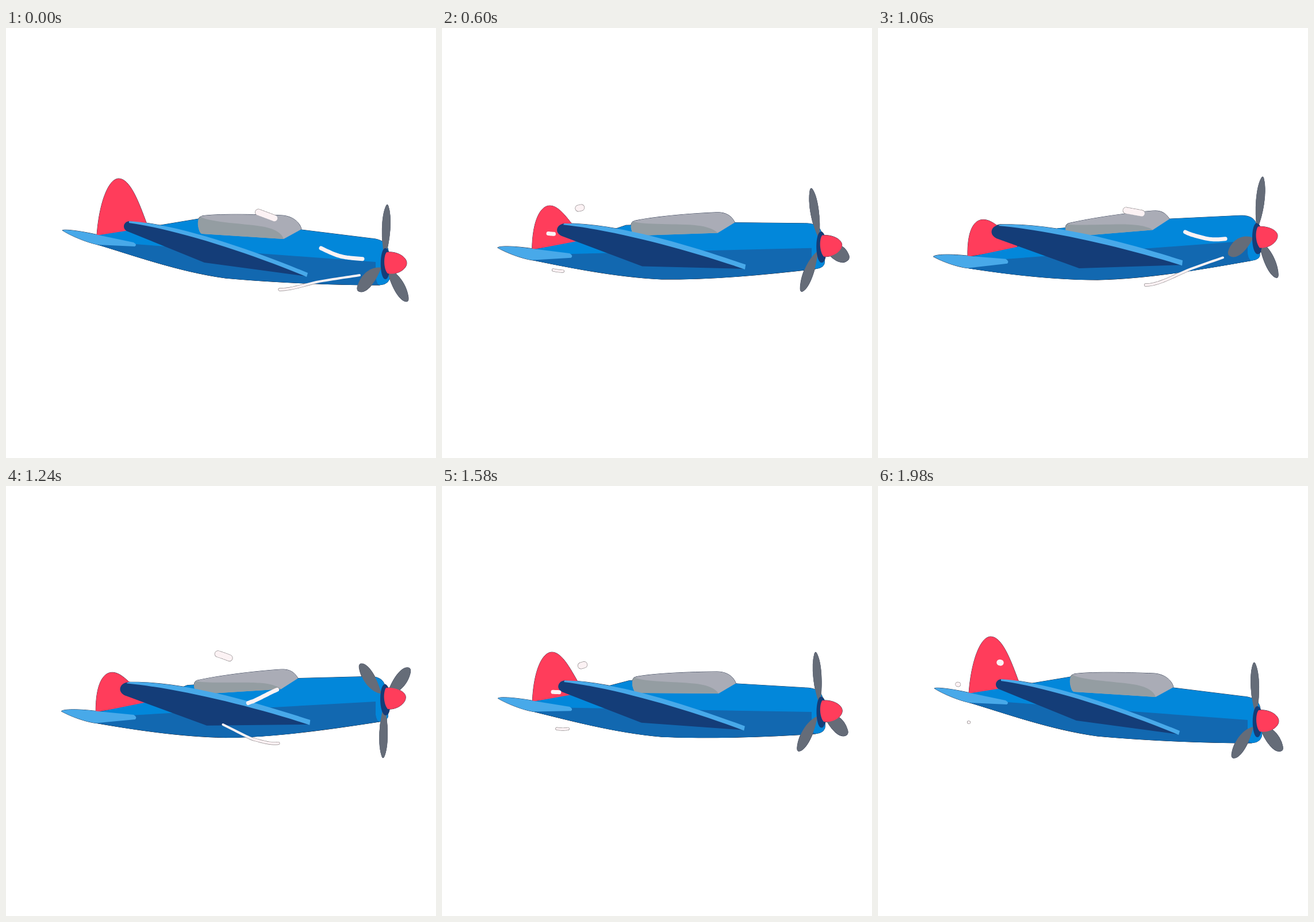
An HTML page that plays this animation: 748x748 px, repeating every 2000 ms.

```html
<!DOCTYPE html>
<html lang="en">
<head>
<meta charset="utf-8">
<title>Propeller plane</title>
<style>
  html, body { margin: 0; width: 100%; height: 100%; overflow: hidden; background: #fff; }
  svg { display: block; width: 100vw; height: 100vh; }
  .streak { fill: none; stroke-linecap: round; stroke-linejoin: round; }
</style>
</head>
<body>
<svg viewBox="0 0 748 748">
  <defs>
    <path id="blade" d="M0 -12C-17 -42 -20 -84 -4 -103Q0 -107 4 -103C20 -84 17 -42 0 -12Z"/>
  </defs>
  <use href="#plane" stroke="#27324a" stroke-width="1"/>
  <g id="edges" stroke="#8d8789"></g>
  <g id="plane">
    <g id="hull"></g>
    <g id="prop" fill="#656c78">
      <use href="#blade"/>
      <use href="#blade" transform="rotate(120)"/>
      <use href="#blade" transform="rotate(240)"/>
    </g>
    <g id="nose"></g>
  </g>
  <g id="streaks" stroke="#fcf2f4"></g>
</svg>
<script>
const LOOP = 2, STEP = 0.02;
const SVG = 'http://www.w3.org/2000/svg';
const get = id => document.getElementById(id);
const mix = (a, b, k) => a + (b - a) * k;

function addPath(parent, attrs) {
  const el = document.createElementNS(SVG, 'path');
  for (const name in attrs) el.setAttribute(name, attrs[name]);
  return get(parent).appendChild(el);
}

// Every part blends between a nose-down and a nose-up outline.
const parts = [];
function part(group, fill, down, up) {
  parts.push({ el: addPath(group, { fill }), down, up: up.match(/\d+/g).map(Number) });
}

const belly = [
  '650 447C560 447 460 442 382 435C300 424 215 393 157 376Z',
  '650 404C560 420 470 436 382 438C300 438 215 427 157 418Z'
];
const glass = [
  'L483 367L341 358Q336 357 334 343Q333 331 ',
  'L478 351L335 363Q328 360 326 350Q326 343 '
];
const blue = '#0287da', sky = '#48a9e9', navy = '#143d78', red = '#ff3d5b';

// Fin, body, shaded belly.
part('hull', red,
  'M158 361C162 305 178 262 196 262C216 262 231 303 245 341L240 350Z',
  'M156 398C155 352 167 334 183 334C199 334 214 350 240 372L243 384Z');
part('hull', blue,
  'M157 361L245 347L335 332L514 351L635 366C650 367 664 373 665 388L668 430Q668 446 ' + belly[0],
  'M157 399L242 381L312 349L507 332L628 326C645 325 656 330 658 342L664 392Q666 402 ' + belly[1]);
part('hull', '#1268b0',
  'M157 376L225 376L643 407L643 432Q645 447 ' + belly[0],
  'M157 418L225 402L643 370L643 392Q645 404 ' + belly[1]);
// Canopy and its shade.
part('hull', '#aaacb6',
  'M341 327C365 323 430 324 480 326C497 327 511 337 514 350' + glass[0] + '341 327Z',
  'M331 340C370 331 430 322 478 318C492 317 500 321 507 332' + glass[1] + '331 340Z');
part('hull', '#949da2',
  'M338 328C355 339 420 340 450 346Q478 352 483 367' + glass[0] + '338 328Z',
  'M329 341C345 345 410 340 440 342Q465 343 478 351' + glass[1] + '329 341Z');
// Tailplane, wing, wing edge.
part('hull', sky,
  'M98 352C102 349 140 355 160 360L222 373Q229 377 224 380L160 377C140 373 112 361 98 352Z',
  'M96 398C102 393 135 394 160 397L222 402Q229 406 225 410L155 418C138 416 112 407 96 398Z');
part('hull', navy,
  'M214 336C204 337 201 350 212 354L345 408L523 432C430 394 310 350 214 336Z',
  'M212 342C196 344 192 359 206 366L350 418L529 412C430 375 310 345 212 342Z');
part('hull', sky,
  'M214 336C300 341 430 387 525 426L523 433C430 394 300 351 214 339Z',
  'M212 342C310 339 430 373 530 404L529 413C430 382 300 352 209 344Z');
// Nose ring and spinner.
part('nose', navy,
  'M660 383C671 383 671 437 660 437C649 437 649 383 660 383Z',
  'M659 339C670 340 672 393 661 393C648 393 648 339 659 339Z');
part('nose', red,
  'M662 390C680 388 697 398 697 409C697 420 680 430 664 427C657 420 656 398 662 390Z',
  'M661 345C680 344 695 352 695 361C695 372 680 383 664 382C656 372 656 352 661 345Z');

// Smooth curve through [x, y] points with rising x.
function curve(pts, x) {
  const last = pts.length - 1;
  if (x <= pts[0][0]) return pts[0][1];
  if (x >= pts[last][0]) return pts[last][1];
  let i = 0;
  while (x > pts[i + 1][0]) i++;
  const slope = n => {
    const a = pts[Math.max(0, n - 1)], b = pts[Math.min(last, n + 1)];
    return (b[1] - a[1]) / (b[0] - a[0]);
  };
  const [x0, y0] = pts[i], [x1, y1] = pts[i + 1];
  const w = x1 - x0, u = (x - x0) / w, v = 1 - u;
  return y0 * (1 + 2 * u) * v * v + y1 * u * u * (3 - 2 * u)
    + w * u * v * (slope(i) * v - slope(i + 1) * u);
}

// Wind streaks: each slides along its line and shrinks from one x range to another.
const streaks = [
  { width: 10.5, from: [439, 467], to: [211.5, 213.5],
    line: [[212, 307], [235, 314], [290, 295], [355, 289], [435, 319], [475, 334]] },
  { width: 7, from: [548, 620], to: [138.5, 140],
    line: [[139, 345], [190, 358], [283, 357], [308, 367], [400, 385], [428, 375],
      [500, 358], [548, 383], [582, 397], [622, 402]] },
  { width: 4, from: [476, 615], to: [157.5, 158.5],
    line: [[158, 411], [213, 423], [275, 405], [327, 404], [354, 405], [431, 441],
      [476, 455], [545, 441], [615, 430]] }
];
for (const s of streaks) {
  s.els = [
    addPath('edges', { class: 'streak', 'stroke-width': s.width + 1.3 }),
    addPath('streaks', { class: 'streak', 'stroke-width': s.width })
  ];
}

const gust = p => 1 - (1 - p ** 1.7) ** 4;

function drawStreak(s, phase, lift) {
  const k = gust(phase), n = 24;
  const [a, b] = s.from.map((x, i) => mix(x, s.to[i], k));
  let d = '';
  for (let i = 0; i <= n; i++) {
    const x = mix(a, b, i / n);
    // The front of the line rises with the nose.
    const y = curve(s.line, x) - lift * Math.max(0, x - 430) * 0.195;
    d += (i ? 'L' : 'M') + x.toFixed(2) + ' ' + y.toFixed(2);
  }
  for (const el of s.els) el.setAttribute('d', d);
}

function draw(now) {
  const t = Math.floor(now / 1000 % LOOP / STEP + 1e-6) * STEP;
  const lift = (1 - Math.cos(Math.PI * t)) / 2;
  for (const p of parts) {
    let i = 0;
    p.el.setAttribute('d', p.down.replace(/\d+/g, v => mix(+v, p.up[i++], lift).toFixed(2)));
  }
  // Two turns a second, with a slow swing in speed.
  const turn = 720 * t - 72 * Math.sin(Math.PI * t - 0.35) - 18.7;
  const hub = mix(412, 361, lift);
  get('prop').setAttribute('transform',
    `translate(658 ${hub.toFixed(2)}) scale(.49 1) rotate(${turn.toFixed(2)})`);
  for (const s of streaks) drawStreak(s, t % 1, lift);
}

function frame(now) {
  draw(now);
  requestAnimationFrame(frame);
}
draw(0);
requestAnimationFrame(frame);
</script>
</body>
</html>
```
